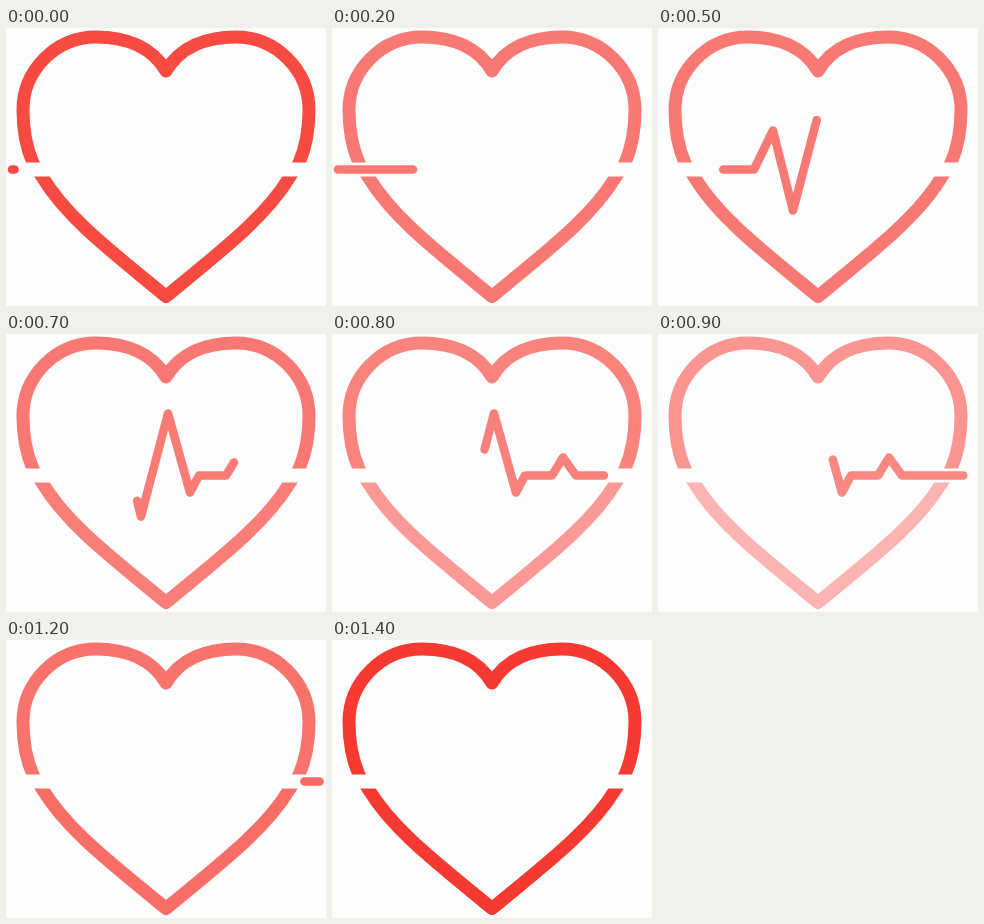
Write an HTML page that moves like this. It is 320 px wide and 278 px high and loops after 1500 ms.

```html
<!DOCTYPE html>
<html lang="en">
<head>
<meta charset="utf-8">
<title>Heartbeat</title>
<style>
  html, body { margin: 0; width: 100%; height: 100%; overflow: hidden; background: #fdfdfd; }
  svg { display: block; }
  path { fill: none; stroke: #f73a31; stroke-width: 13; stroke-linejoin: round; }
  #pulse { stroke-width: 8.6; stroke-linecap: round; }
</style>
</head>
<body>
<svg width="320" height="278" viewBox="0 0 320 278">
  <path id="upper" d="M30 141 L27 135 C20 119 17 101 17 82 C17 42 50 9 90 9
    C120 9 146 19 160 43 C174 19 200 9 230 9 C270 9 303 42 303 82
    C303 101 300 119 293 135 L290 141"/>
  <path id="lower" d="M31.6 141.5 L36.3 149 C61 190 105 223 160 268.5
    C215 223 259 190 283.7 149 L288.4 141.5"/>
  <rect y="134.5" width="320" height="14" fill="#fdfdfd"/>
  <path id="pulse" pathLength="1" d="M6 141.5 H96 l19 -39 20 80 27 -103 22 79 9 -17 h27 l11 -18 13 18 H313.5"/>
</svg>
<script>
const LOOP = 1500, STEP = 100, REST = 0.67;
const [upper, lower, pulse] = ['upper', 'lower', 'pulse'].map(id => document.getElementById(id));

// Smooth hump: 1 at the centre, 0 from 300 ms away, wrapping around the loop.
function hump(t, centre) {
  const gap = Math.abs(t - centre);
  const distance = Math.min(gap, LOOP - gap, 300);
  return (1 + Math.cos(Math.PI * distance / 300)) / 2;
}

// Sine ease in and out over one second.
function travel(t) {
  const x = Math.min(1, Math.max(0, t / 1022));
  return (1 - Math.cos(Math.PI * x)) / 2;
}

function draw(t) {
  const glow = REST + (1 - REST) * hump(t, 1400);
  upper.style.opacity = glow - 0.19 * hump(t, 1000);
  lower.style.opacity = glow - 0.32 * hump(t, 950);

  const head = travel(t + 43), tail = travel(t - 285);
  pulse.style.opacity = head > tail ? glow - 0.08 * hump(t, 950) : 0;
  pulse.style.strokeDasharray = `${head - tail} 2`;
  pulse.style.strokeDashoffset = -tail;
}

const start = performance.now();
function frame() {
  const t = (performance.now() - start) % LOOP;
  draw(Math.floor(t / STEP) * STEP);
  requestAnimationFrame(frame);
}
frame();
</script>
</body>
</html>
```
